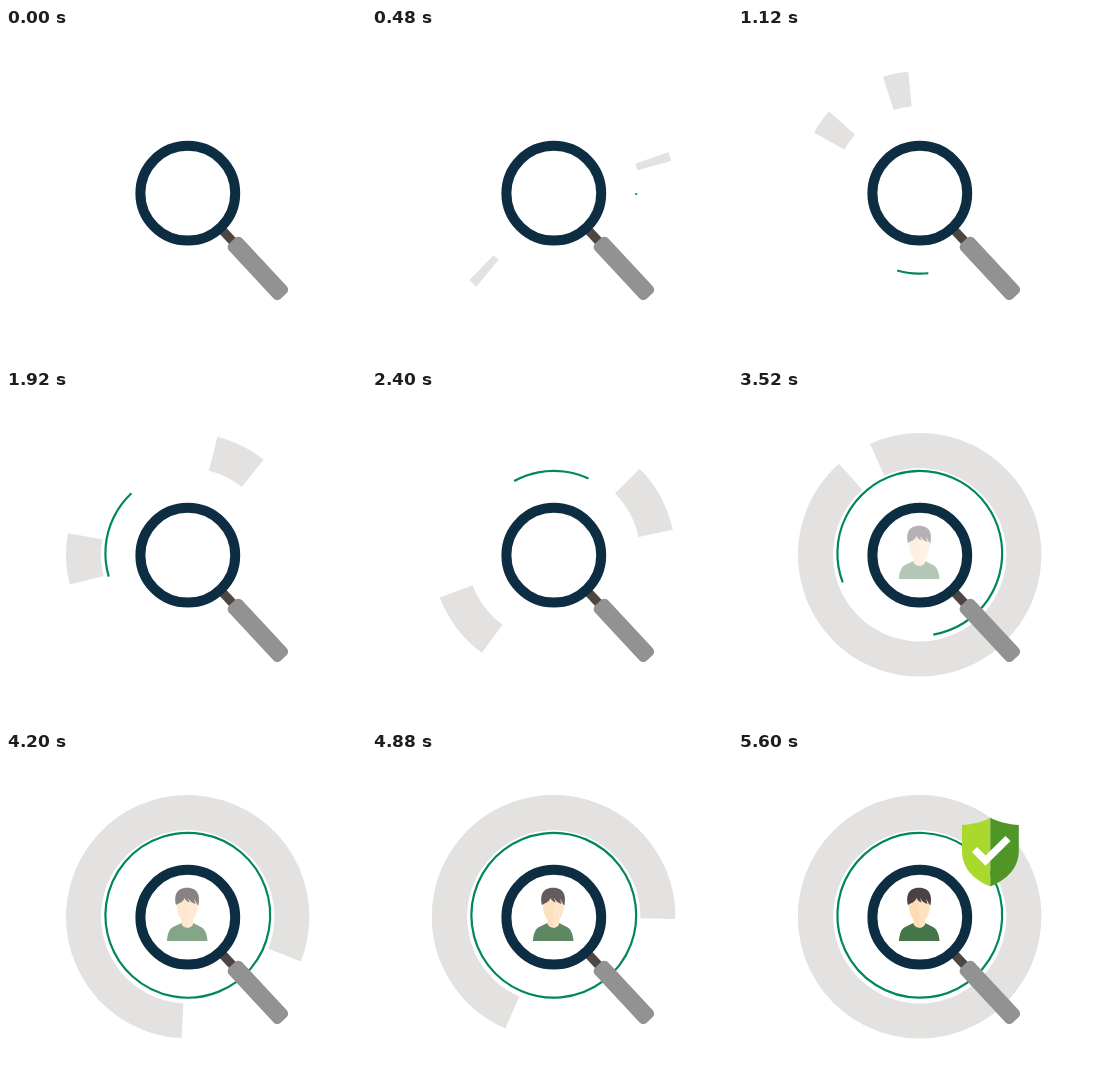
Write an HTML page that moves like this. It is 360 px wide and 334 px high and loops after 6.6 s.

```html
<!DOCTYPE html>
<html lang="en">
<head>
<meta charset="utf-8">
<title>Identity check</title>
<style>
html, body { margin: 0; width: 100%; height: 100%; overflow: hidden; background: #fff; }
svg { display: block; width: 360px; height: 334px; }
</style>
</head>
<body>
<svg viewBox="0 0 360 334">
  <g fill="none">
    <g stroke="#e3e2e0" stroke-width="35">
      <path id="bandA"/>
      <path id="bandB"/>
    </g>
    <path id="line" stroke="#00875c" stroke-width="2.2"/>
  </g>

  <g transform="translate(181.8 165.2)">
    <g transform="rotate(47)">
      <rect x="48" y="-4.5" width="20" height="9" fill="#4d4643"/>
      <rect x="65" y="-9" width="75.500" height="18" rx="5" fill="#929292"/>
    </g>
    <circle r="47.4" fill="#fff" stroke="#0c2d42" stroke-width="10"/>
  </g>

  <g id="person">
    <path fill="#44764a" d="M160.800 189C161.500 182 163 177 167 175L175.500 171H187L195 175C199 177 201 182 201.500 189Z"/>
    <path fill="#fddcb4" d="M170.800 146H192C192.500 156 191 163 187 167.500V172C185 177 177.500 177 175.500 172V167.500C171.500 163 170.300 156 170.800 146Z"/>
    <path fill="#fde2c2" d="M181.300 146H192C192.500 156 191 163 187 167.500V172C186 174.500 184 175.700 181.300 175.700Z"/>
    <path fill="#4b4244" d="M170 153C168 145 169.500 135.800 181 135.800C193 135.800 194 145 192.500 153.500L191 152L188 146.500L189.500 152C186 151 183.500 149 182 145.500L183.500 150.500C181 149.500 179.500 148 178.500 146C177.500 149 175 150.500 172.500 151.500Z"/>
  </g>

  <g id="shield">
    <path fill="#a9d92c" d="M252.300 65.800C245 70 234 72.500 224 73V99C224 116 236 128 252.300 134.500Z"/>
    <path fill="#4f9626" d="M252.300 65.800C260 70 271 72.500 280.800 73V99C280.800 116 268.500 128 252.300 134.500Z"/>
    <path fill="none" stroke="#fff" stroke-width="7.300" d="M236.500 97.500L247.500 108.500L270 86.500"/>
  </g>
</svg>
<script>
const LOOP = 6600, STEP = 40;
const AXIS = 237.2;   // the two bands mirror each other across this angle
const TURN = 2920;    // the opening drift ends, the closing sweep begins
const el = id => document.getElementById(id);

const clamp = u => Math.min(Math.max(u, 0), 1);
const easeIn = p => u => u ** p;
const easeOut = p => u => 1 - (1 - u) ** p;
const tween = (t, t0, t1, ease = u => u) => ease(clamp((t - t0) / (t1 - t0)));

// Angle after t ms of steadily slowing rotation
const drift = (t, from, speed, drag) => from + t * (speed - drag * t);

function bandHead(t) {
  return drift(Math.min(t, TURN), -180, 0.1697, 2.02e-5)
    + 226 * tween(t, TURN, 4200, easeOut(4))
    + 176 * tween(t, 4200, 5440, easeIn(1.5));
}

function bandTail(t) {
  return drift(Math.min(t, TURN), -180, 0.1614, 2.25e-5)
    + 140 * tween(t, TURN, 5440, easeOut(2.5));
}

const lineHead = t => drift(t, -79, 0.1733, 7.3e-6);

// The line swells and thins once, then opens into a full circle
function lineSpan(t) {
  const swell = 64 * Math.sin(Math.PI * Math.min(t, TURN) / 4040) ** 4;
  return swell + (360 - swell) * tween(t, TURN, 4080, easeOut(2));
}

function arc(cx, cy, r, a, b) {
  const from = Math.min(a, b), span = Math.min(Math.abs(b - a), 360);
  if (span < 0.05) return "";
  const point = deg => {
    const rad = deg * Math.PI / 180;
    return (cx + r * Math.cos(rad)).toFixed(2) + " " + (cy + r * Math.sin(rad)).toFixed(2);
  };
  let d = "M" + point(from);
  for (let i = 1; i <= 3; i++) d += `A${r} ${r} 0 0 1 ${point(from + span * i / 3)}`;
  return span === 360 ? d + "Z" : d;
}

function draw(time) {
  const t = Math.floor((time % LOOP) / STEP) * STEP;
  const band = side => arc(181.7, 164.8, 104.2, AXIS + side * bandTail(t), AXIS + side * bandHead(t));
  const head = lineHead(t);
  el("bandA").setAttribute("d", band(1));
  el("bandB").setAttribute("d", band(-1));
  el("line").setAttribute("d", arc(181.8, 163.3, 82.4, head - lineSpan(t), head));
  el("person").setAttribute("opacity", tween(t, 2600, 5600, easeOut(1.4)));
  el("shield").setAttribute("opacity", tween(t, 5040, 5440));
}

const start = performance.now();
function tick() {
  draw(performance.now() - start);
  requestAnimationFrame(tick);
}
tick();
</script>
</body>
</html>
```
